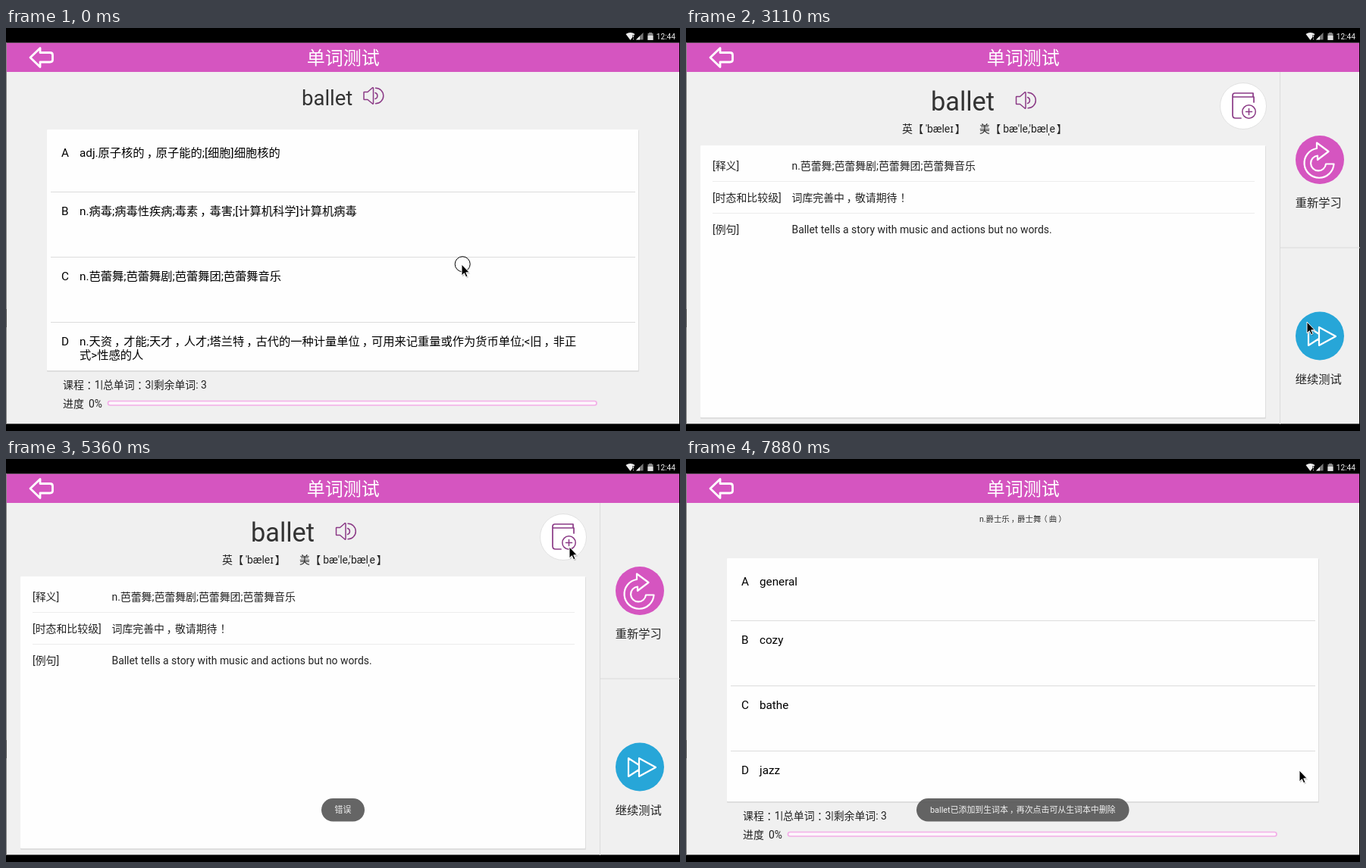
Recreate the animation shown at these times as an HTML page. Size 889 by 532 pixels, loop 8 s.

```html
<!DOCTYPE html>
<html lang="zh-CN">
<head>
<meta charset="utf-8">
<title>单词测试</title>
<style>
html, body { margin: 0; width: 100%; height: 100%; overflow: hidden; background: #f0f0f0; }
svg { display: block; width: 889px; height: 532px; }
text { font-family: Roboto, "Noto Sans CJK SC", sans-serif; white-space: pre; }
.line { fill: none; stroke-linejoin: round; stroke-linecap: round; }
.hidden { display: none; }
</style>
</head>
<body>
<svg id="stage" viewBox="0 0 889 532"></svg>
<script>
const LOOP = 8000;
const PINK = '#d555c0', BLUE = '#27a6d8', PLUM = '#8b3a86';
const BIG = 15.25, MID = 13.9, SMALL = 10.4;

// Full-width marks sit in the middle of their cell.
const SHIFT = { '，': .2, '：': .25, '！': .3, '（': -.2, '）': .2, '【': -.22, '】': .14 };
function centred(s) {
  let back = 0;
  return s.split(/([，：！（）【】])/).filter(Boolean).map(part => {
    const shift = SHIFT[part] || 0;
    const dx = (shift + back).toFixed(2);
    back = -shift;
    return `<tspan dx="${dx}em">${part.replace(/</g, '&lt;')}</tspan>`;
  }).join('');
}

const text = (x, y, size, s, fill = '#222', anchor = 'start') =>
  `<text x="${x}" y="${y}" font-size="${size}" fill="${fill}" text-anchor="${anchor}">${centred(s)}</text>`;
const rect = (x, y, w, h, fill, extra = '') =>
  `<rect x="${x}" y="${y}" width="${w}" height="${h}" fill="${fill}" ${extra}/>`;
const circle = (x, y, r, fill, extra = '') =>
  `<circle cx="${x}" cy="${y}" r="${r}" fill="${fill}" ${extra}/>`;
const line = (d, color, width) =>
  `<path class="line" d="${d}" stroke="${color}" stroke-width="${width}"/>`;
const group = (id, body, cls = 'hidden') => `<g id="${id}" class="${cls}">${body}</g>`;
const card = (x, y, w, h) =>
  rect(x, y + 1, w + 1, h + 1, '#dedede', 'rx="1"') + rect(x, y, w, h, '#fefefe', 'rx="1"');

const speaker = (x, y) => `<g transform="translate(${x} ${y})">` +
  line('M1 6.5H5.5L12 .8Q13 .5 13 1.5V21.5Q13 22.5 12 22L5.5 16.5H1Q.5 16.5 .5 16V7Q.5 6.5 1 6.5Z' +
       'M15.5 7.5A4.2 4.2 0 0 1 15.5 15.5M16 1.2A10.3 10.3 0 0 1 16 21.8', PLUM, 1.5) + '</g>';

function quiz(id, top, head, rows, hot) {
  const dy = top - 134;
  const bands = [[top + 6, 77], [218 + dy, 85], [304 + dy, 85], [390 + dy, 62]];
  const bases = [170, 247.3, 333.3, 419.3];
  let body = head + card(54, top, 780, 452 - top);
  if (hot >= 0) body += group(id + 'Hot', rect(59, bands[hot][0], 771, bands[hot][1], '#e5e5e5'));
  for (const y of [216, 302, 388]) body += rect(59, y + dy, 771, 1, '#dcdcdc');
  rows.forEach((row, i) => {
    body += text(73, bases[i] + dy, BIG, 'ABCD'[i], '#000');
    row.split('\n').forEach((s, k) => body += text(97, bases[i] + dy + 18 * k, BIG, s, '#000'));
  });
  body += text(75, 475.5, MID, '课程：1|总单词：3|剩余单词: 3') +
    text(75, 501, MID, '进度') + text(109, 501, MID, '0%') +
    rect(134.5, 492.5, 644.5, 5.5, '#fdf6fc', 'rx="2.7" stroke="#f3aee8" stroke-width="1.7"');
  return group(id, body);
}

const caption = s => text(444.3, 83, SMALL, s, '#333', 'middle');

const sideButton = (y, color, icon, label) =>
  circle(836, y, 32, color) + line(icon, '#fff', 2.2) + text(834.3, y + 62, BIG, label, '#222', 'middle');

const detail = () => group('detail',
  text(323, 109, 34.3, 'ballet', '#333') + speaker(435, 84) +
  text(285, 137.5, MID, '英 【ˈbæleɪ】') + text(387, 137.5, MID, "美 【bæ'le,'bælˌe】") +
  circle(735, 103, 30.5, '#fff', 'stroke="#e2e2e2"') +
  line('M732 119H725Q721 119 721 115V89Q721 86 724 86H748V91H722M749 91V98', PLUM, 1.7) +
  group('plus', circle(742.5, 110.5, 8.7, '#fff', `stroke="${PLUM}" stroke-width="1.5"`) +
    line('M738.5 110.5H746.5M742.5 106.5V114.5', PLUM, 1.5)) +
  group('tick', circle(742.5, 110.5, 9.5, BLUE) + line('M738.5 110.5L741.5 113.5L747 108', '#fff', 1.6)) +
  card(19, 155, 745, 359) +
  rect(35, 202, 715, 1, '#ececec') + rect(35, 244, 715, 1, '#ececec') +
  [['释义', 'n.芭蕾舞;芭蕾舞剧;芭蕾舞团;芭蕾舞音乐'],
   ['时态和比较级', '词库完善中，敬请期待！'],
   ['例句', 'Ballet tells a story with music and actions but no words.']]
    .map(([k, v], i) => text(35, 186.5 + 42.2 * i, MID, `[${k}]`) + text(139.5, 186.5 + 42.2 * i, MID, v)).join('') +
  rect(783, 58, 1, 465, '#dcdcdc') + rect(783, 289.5, 106, 1, '#dcdcdc') +
  sideButton(174, PINK, 'M832 151.5L847.5 163L833 174V168.5A10 10 0 1 0 844 179.500H854.5A19.5 19.5 0 1 1 832 159Z', '重新学习') +
  sideButton(406.5, BLUE, 'M821 395V419L835 410V419L857 407L835 395V404ZM835 404V410', '继续测试'));

const toast = (id, x, w, s) => group(id,
  rect(x, 448, w, 30.5, 'rgba(80,80,80,.88)', 'rx="15.2"') +
  text(x + w / 2, 467.3, 10.9, s, '#f2f2f2', 'middle'), '');

const frame =
  rect(0, 0, 889, 532, '#f0f0f0') + rect(1, 19.5, 887, 38.5, PINK) +
  rect(0, 0, 889, 19.5, '#000') + rect(0, 522.5, 889, 9.5, '#000') +
  rect(0, 19, 1, 504, '#888') + rect(0, 371, 1, 24, '#555') + rect(888, 19, 1, 504, '#000') +
  line('M32 39L45 26.5V32.5H58Q61.5 32.5 61.5 35.5V42Q61.5 45 58 45H45V51.5Z', '#fff', 2.8) +
  text(444.7, 48, 24, '单词测试', '#fff', 'middle') +
  '<path d="M817.5 8Q823.5 4 829.5 8L823.5 16Z" fill="#eee"/>' +
  '<path d="M831 15.5L840.5 6V15.5Z" fill="#777"/><path d="M831 15.5L836 10.5V15.5Z" fill="#eee"/>' +
  rect(826.5, 9, 1.5, 4, '#000') + rect(827, 9.5, 1, 3, '#ddd') + rect(827, 14, 1, 1.2, '#ddd') +
  rect(848, 6, 4, 2, '#888') + rect(846.5, 7, 7, 9, '#888') + rect(846.5, 10, 7, 6, '#ddd') +
  text(857.7, 14.5, 10.2, '12:44', '#eee');

const pointer = '<g id="pointer">' +
  '<circle id="ring" cx="1.2" cy="-.3" r="10" fill="none" stroke="#000"/>' +
  '<g transform="scale(1.06)">' +
  '<path d="M1 1.5V15.5L4.2 12.5L6.3 17.3L8.5 16.3L6.4 11.7H10.7Z" fill="#000" opacity=".2"/>' +
  '<path d="M0 0V14L3.2 11L5.3 15.8L7.5 14.8L5.4 10.2H9.7Z" fill="#000" stroke="#fff" stroke-width=".9"/></g></g>';

document.getElementById('stage').innerHTML =
  quiz('quizWord', 134, text(390, 101.5, 27.5, 'ballet', '#333') + speaker(471.5, 78), [
    'adj.原子核的，原子能的;[细胞]细胞核的',
    'n.病毒;病毒性疾病;毒素，毒害;[计算机科学]计算机病毒',
    'n.芭蕾舞;芭蕾舞剧;芭蕾舞团;芭蕾舞音乐',
    'n.天资，才能;天才，人才;塔兰特，古代的一种计量单位，可用来记重量或作为货币单位;<旧，非正\n式>性感的人'], 2) +
  quiz('quizBallet', 131, caption('n.芭蕾舞;芭蕾舞剧;芭蕾舞团;芭蕾舞音乐'), ['shallow', 'ballet', 'global', 'pain'], 0) +
  quiz('quizJazz', 131, caption('n.爵士乐，爵士舞（曲）'), ['general', 'cozy', 'bathe', 'jazz'], -1) +
  detail() +
  toast('wrong', 416, 57, '错误') +
  toast('added', 304, 280.5, 'ballet已添加到生词本，再次点击可从生词本中删除') +
  pointer;
document.getElementById('stage').insertAdjacentHTML('afterbegin', frame);

// Runs of picture changes: first time, last time, count.
const RUNS = [[150, 1180, 8], [1330, 1630, 3], [2080, 3110, 8], [3560, 4590, 8],
              [4740, 5360, 5], [5650, 6690, 8], [6840, 7580, 6], [7880, 7880, 1]];
const TICKS = [0].concat(...RUNS.map(([a, b, n]) =>
  Array.from({ length: n }, (_, i) => a + (n > 1 ? (b - a) * i / (n - 1) : 0))));

// Pointer path: time, x, y.
const PATH = [[0, 601, 312], [600, 601, 312], [886, 578, 345], [1033, 553, 367], [1180, 560, 370],
  [1630, 692, 407], [2080, 700, 392], [2520, 752, 332], [2816, 800, 362], [3110, 819, 388],
  [3854, 819, 388], [4590, 487, 174], [4888, 487, 174], [5360, 743, 116], [5797, 743, 116],
  [6092, 640, 215], [6239, 566, 320], [6386, 610, 415], [6690, 792, 435], [6988, 840, 420],
  [7136, 850, 412], [7580, 851, 412], [7880, 809, 411]];
const SCREENS = [[0, 'quizWord'], [297, 'detail'], [3707, 'quizBallet'], [5030, 'detail'], [7430, 'quizJazz']];
const CLICKS = [[0, 290], [3560, 3700], [4740, 4880], [5650, 5790], [7280, 7425]];

const el = id => document.getElementById(id);
const show = (id, on) => el(id).classList.toggle('hidden', !on);
const ramp = (t, a, b) => Math.min(1, Math.max(0, (t - a) / (b - a)));
const within = (t, a, b) => t >= a && t < b;

function pointAt(t) {
  const i = PATH.findIndex(p => p[0] > t);
  if (i < 0) return PATH[PATH.length - 1].slice(1);
  const [a, b] = [PATH[i - 1], PATH[i]];
  const k = ramp(t, a[0], b[0]);
  return [1, 2].map(n => a[n] + (b[n] - a[n]) * k);
}

function draw(t) {
  const screen = SCREENS.filter(s => s[0] <= t + 1).pop()[1];
  for (const [, id] of SCREENS) show(id, id === screen);
  show('quizWordHot', t >= 150);
  show('quizBalletHot', t >= 4740);
  show('plus', t < 5790);
  show('tick', t >= 5790);
  show('ring', CLICKS.some(([a, b]) => within(t, a, b)));
  el('wrong').style.opacity = t < 4000
    ? ramp(t, 400, 730) - ramp(t, 2450, 2800)
    : ramp(t, 4950, 5300) - ramp(t, 7010, 7500);
  el('added').style.opacity = ramp(t, 6950, 7255);
  const [x, y] = pointAt(t);
  el('pointer').setAttribute('transform', `translate(${x.toFixed(1)} ${y.toFixed(1)})`);
}

const start = performance.now();
let last = -1;
function loop() {
  const now = (performance.now() - start) % LOOP;
  const tick = TICKS.filter(t => t <= now).pop();
  if (tick !== last) draw(last = tick);
  requestAnimationFrame(loop);
}
loop();
</script>
</body>
</html>
```
